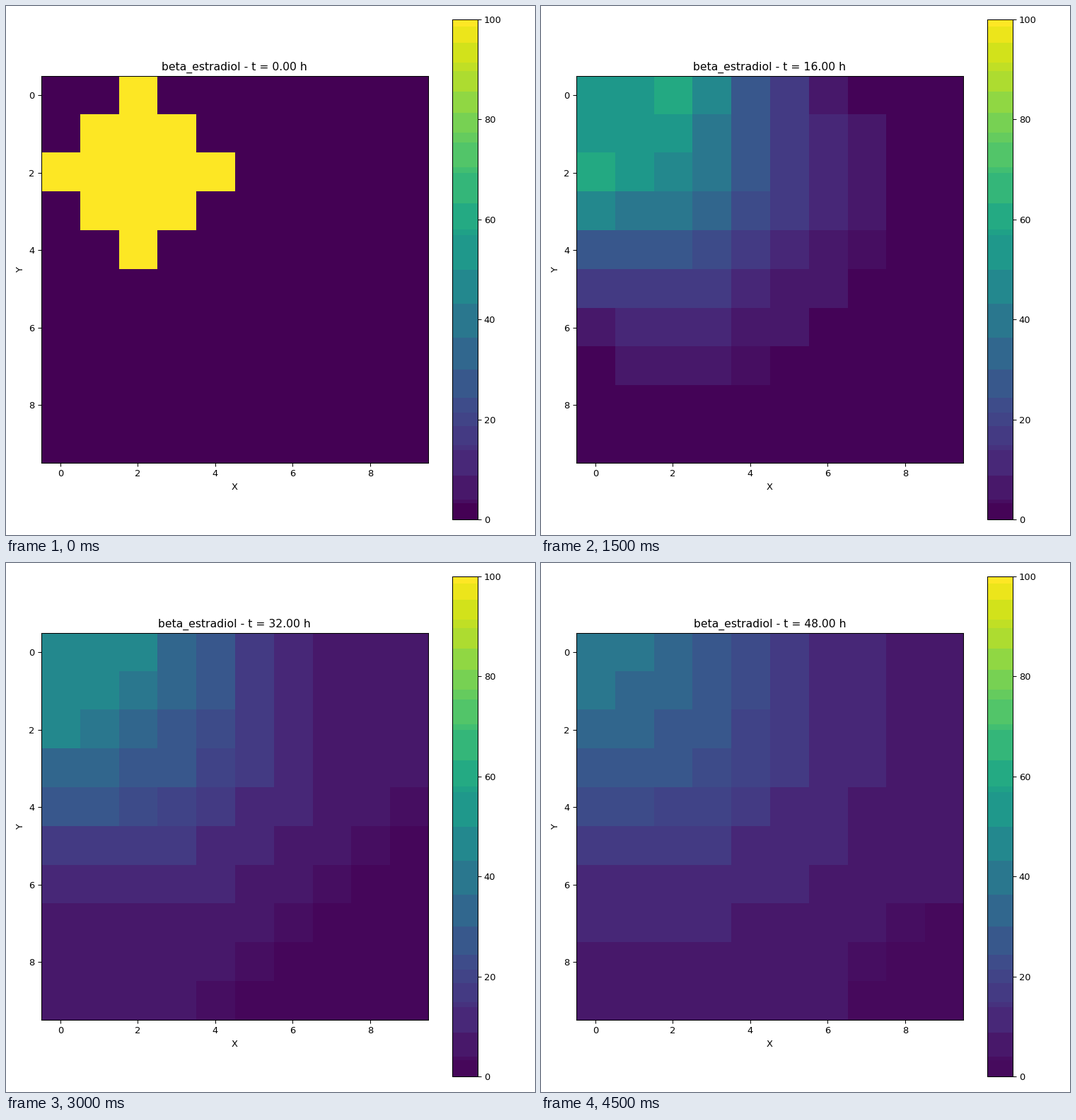
Animation, 748 px wide and 748 px high, one loop 5000 ms. Source, as a matplotlib script:

```python
import numpy as np
import matplotlib
import matplotlib.pyplot as plt
from matplotlib.animation import FuncAnimation
from matplotlib.colors import ListedColormap

SIZE, INCHES = 748, 8
N, FRAMES, HOURS = 10, 10, 48.0
RATE = 0.194      # cells^2 per hour
STEPS = 400       # integration steps between two frames

# Value bands of the stepped colour scale
EDGES = np.array([0, 3.2, 4.0, 8.7, 13.8, 14.9, 18.7, 21.4, 24.3, 30, 36.3,
                  43.1, 50, 56.8, 58, 63.2, 69.3, 70.4, 75.4, 77.4, 81.3,
                  85.6, 89.7, 91.4, 95.3, 98.6, 100])
VIRIDIS = matplotlib.colormaps["viridis"]


def start():
    y, x = np.mgrid[:N, :N]
    return np.where((x - 2) ** 2 + (y - 2) ** 2 <= 4, 100.0, 0.0)


def slope(u):
    """Diffusion inside; rim cells only follow their inner neighbour."""
    inner = u[1:-1, 1:-1]
    d = np.pad(inner, 1, mode="edge") - u
    d[1:-1, 1:-1] = (u[:-2, 1:-1] + u[2:, 1:-1] + u[1:-1, :-2]
                     + u[1:-1, 2:] - 4 * inner)
    return RATE * d


def simulate():
    u = start()
    fields = [u]
    dt = HOURS / (FRAMES - 1) / STEPS
    for _ in range(FRAMES - 1):
        for _ in range(STEPS):
            u = u + dt * slope(u)
        fields.append(u)
    return fields


def stepped_map(k):
    """Viridis in flat bands; the lowest band brightens slightly with time."""
    mids = (EDGES[:-1] + EDGES[1:]) / 2
    mids[0] = 0.3 * k
    mids[-1] = 100
    levels = (np.arange(1000) + 0.5) / 10
    band = np.searchsorted(EDGES, levels, side="right") - 1
    return ListedColormap(VIRIDIS(mids[band] / 100))


def draw(k):
    grid.set_data(fields[k])
    grid.set_cmap(maps[k])
    title.set_text(f"beta_estradiol - t = {HOURS * k / (FRAMES - 1):.2f} h")
    return grid, title


plt.rcParams["font.family"] = "DejaVu Sans"
fields = simulate()
maps = [stepped_map(k) for k in range(FRAMES)]

fig, ax = plt.subplots(figsize=(INCHES, INCHES), dpi=SIZE / INCHES)
grid = ax.imshow(fields[0], cmap=maps[0], vmin=0, vmax=100,
                 interpolation="nearest")
fig.colorbar(grid, ax=ax)
ax.set_xlabel("X")
ax.set_ylabel("Y")
title = ax.set_title("")
draw(0)
fig.tight_layout()

anim = FuncAnimation(fig, draw, frames=FRAMES, interval=500, repeat=True)
plt.show()
```
